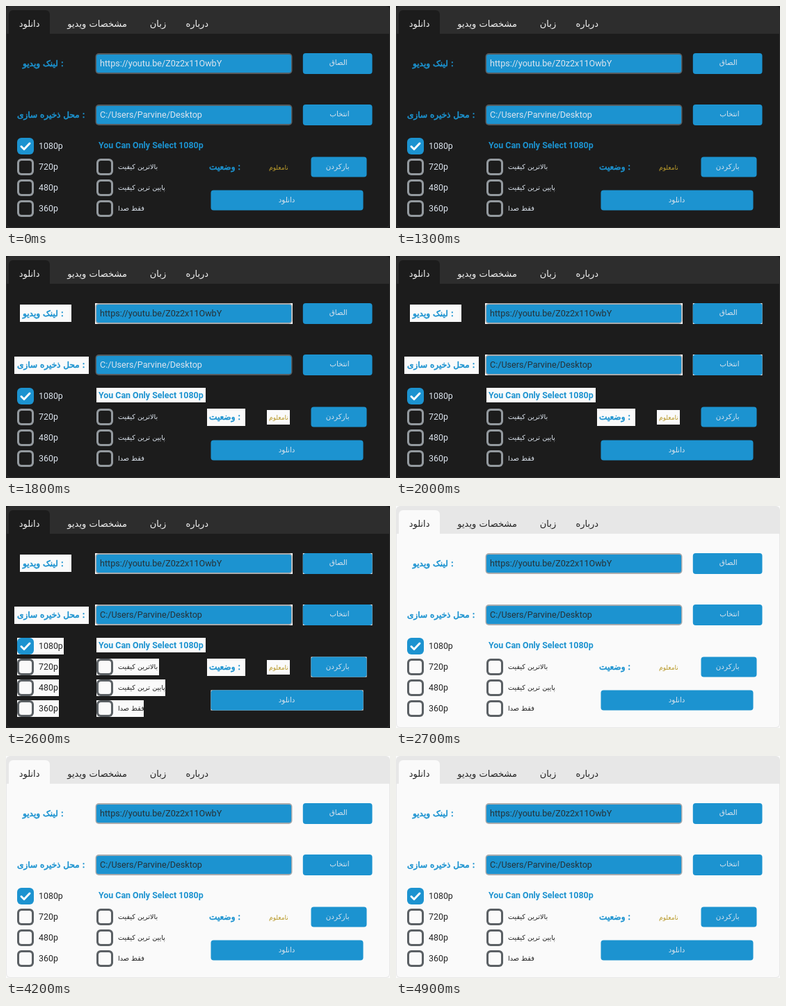
An HTML page with a canvas for the animation above (5000 ms loop, 552 px wide and 320 px high).

```html
<!DOCTYPE html>
<html lang="fa">
<head>
<meta charset="utf-8">
<style>
html, body { margin: 0; width: 552px; height: 320px; overflow: hidden; background: #1c1c1c; }
canvas { display: block; }
</style>
</head>
<body>
<canvas id="stage" width="552" height="320"></canvas>
<script>
const ctx = document.getElementById('stage').getContext('2d');
const LOOP = 5000, SWITCH = 1400, STEP = 70, WINDOW_SWITCH = 2700;
const BLUE = '#1c93d0';
const latin = size => `${size}px Roboto, sans-serif`;
const persian = size => `${size}px "DejaVu Sans", sans-serif`;

function box(x, y, w, h, r, color) {
  ctx.fillStyle = color;
  ctx.beginPath();
  ctx.roundRect(x, y, w, h, r);
  ctx.fill();
}

function text(str, x, y, font, color, align = 'left', weight = 0) {
  ctx.font = font;
  ctx.fillStyle = ctx.strokeStyle = color;
  ctx.textAlign = align;
  ctx.fillText(str, x, y);
  if (weight) {
    ctx.lineWidth = weight;
    ctx.strokeText(str, x, y);
  }
}

// Each widget owns a rectangular backing that takes its own theme.
const backing = (x, y, w, h, light) => box(x, y, w, h, 0, light ? '#fafafa' : '#1c1c1c');

const label = (str, x, base, font, rect, weight = 0, color = BLUE) => light => {
  backing(...rect, light);
  text(str, x, base, font, color, 'left', weight);
};

const entry = (str, y) => light => {
  backing(128, y, 284, 30, light);
  box(128.5, y, 283, 30, 5, light ? '#a9abad' : '#565b5e');
  box(130, y + 2, 280, 26, 3, BLUE);
  text(str, 135, y + 19, latin(12.6), light ? '#263238' : '#dce4ee');
};

const button = (str, x, y, w, h) => light => {
  backing(x, y, w, h, light);
  box(x, y, w, h, 4, BLUE);
  text(str, x + w / 2 - 0.5, y + 17.3, persian(10.3), '#dce4ee', 'center');
};

const check = (str, x, y, w, font, base, on) => light => {
  backing(x, y, w, 24, light);
  if (on) {
    box(x, y, 24, 24, 6, BLUE);
    ctx.strokeStyle = '#fff';
    ctx.lineWidth = 3;
    ctx.lineCap = ctx.lineJoin = 'round';
    ctx.beginPath();
    ctx.moveTo(x + 6, y + 12.5);
    ctx.lineTo(x + 10, y + 16.5);
    ctx.lineTo(x + 18, y + 8);
    ctx.stroke();
  } else {
    box(x, y, 24, 24, 6, light ? '#5b6064' : '#949a9f');
    box(x + 3, y + 3, 18, 18, 3.5, light ? '#fafafa' : '#1c1c1c');
  }
  text(str, x + 31, y + base, font, light ? '#242424' : '#dce4ee');
};

const quality = (str, y, w, on) => check(str, 16, y, w, latin(12.4), 16, on);
const option = (str, y, w) => check(str, 130, y, w, persian(9.7), 14.7);
const heading = (str, x, base, rect) => label(str, x, base, persian(12.1), rect, 0.6);

// Listed in the order in which they change theme.
const widgets = [
  heading('لینک ویدیو :', 24, 87, [20, 70, 74, 25]),
  heading('محل ذخیره سازی :', 16, 161, [12, 145, 107, 25]),
  label('You Can Only Select 1080p', 133, 205, 'bold ' + latin(12.4), [130, 190, 157, 21]),
  heading('وضعیت :', 292, 236, [289, 220, 55, 25]),
  label('نامعلوم', 378, 235.5, persian(9.1), [375, 222, 33, 21], 0, '#b99a2b'),
  entry('https://youtu.be/Z0z2x11OwbY', 68),
  entry('C:/Users/Parvine/Desktop', 142),
  button('الصاق', 426.8, 68, 99.7, 30),
  button('انتخاب', 426.8, 142, 99.7, 30),
  button('بازکردن', 438.5, 217.4, 80, 29.2),
  button('دانلود', 294.5, 265.4, 219, 29.2),
  quality('1080p', 190, 67, true),
  quality('720p', 220, 60),
  quality('480p', 250, 60),
  quality('360p', 280, 60),
  option('بالاترین کیفیت', 220, 90),
  option('پایین ترین کیفیت', 250, 99),
  option('فقط صدا', 280, 68)
];

const tabs = [['دانلود', 33.5], ['مشخصات ویدیو', 127.5], ['زبان', 216], ['درباره', 275.5]];

function drawWindow(light) {
  const body = light ? '#fafafa' : '#1c1c1c';
  box(0, 0, 552, 320, 0, body);
  box(0, 0, 552, 320, 6, light ? '#e7e7e7' : '#2d2d2d');
  box(1, 40, 550, 279, [0, 0, 5, 5], body);
  box(4, 6, 59, 35, [6, 6, 0, 0], body);
  for (const [name, x] of tabs)
    text(name, x, 30, persian(13), light ? '#242424' : '#f2f2f2', 'center');
}

function frame(now) {
  const t = Math.floor(now % LOOP / 100) * 100;
  ctx.direction = 'ltr';
  drawWindow(t >= WINDOW_SWITCH);
  widgets.forEach((draw, i) => draw(t >= SWITCH + i * STEP));
  requestAnimationFrame(frame);
}
requestAnimationFrame(frame);
</script>
</body>
</html>
```
